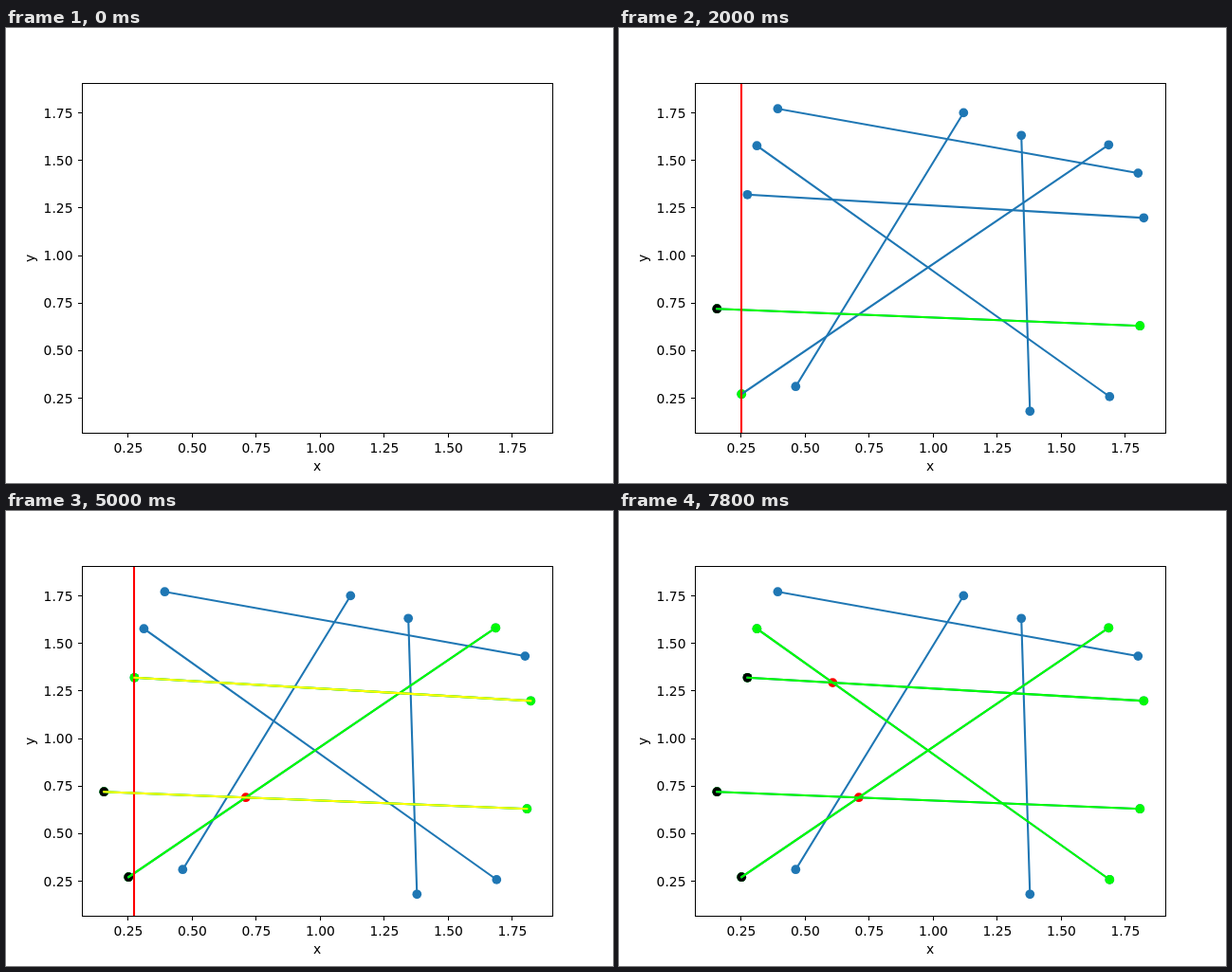
These frames come from a looping animation (640x480 px, 8000 ms). An HTML page with a canvas:

```html
<!DOCTYPE html>
<html lang="en">
<head>
<meta charset="utf-8">
<title>Sweep line</title>
<style>
  html, body { margin: 0; width: 100%; height: 100%; overflow: hidden; background: #fff; }
  canvas { display: block; }
</style>
</head>
<body>
<canvas id="stage" width="640" height="480"></canvas>
<script>
const ctx = document.getElementById('stage').getContext('2d');
const STEP_MS = 200, STEPS = 40;
const BLUE = '#1f77b4', GREEN = '#00ff00', YELLOW = '#ffff00', RED = '#ff0000', BLACK = '#000';
const BOX = { left: 80, right: 576, top: 58, bottom: 427 };

// Each segment runs from its left end to its right end: x1, y1, x2, y2.
const low = [103.3, 296.2, 549.3, 314.2];
const rising = [129.2, 386.2, 516.3, 123.3];
const high = [135.4, 175.8, 553.3, 200.3];
const falling = [145.4, 124.2, 517.3, 388.9];
const segments = [
  low, rising, high, falling,
  [167.4, 85.2, 547.3, 153.1],
  [186.3, 378.2, 363.3, 89.4],
  [424.2, 113.3, 433.3, 404.3]
];
const leftEnd = s => s.slice(0, 2);
const rightEnd = s => s.slice(2);

function crossing([ax, ay, bx, by], [cx, cy, dx, dy]) {
  const ux = bx - ax, uy = by - ay, vx = dx - cx, vy = dy - cy;
  const k = ((cx - ax) * vy - (cy - ay) * vx) / (ux * vy - uy * vx);
  return [ax + k * ux, ay + k * uy];
}

// Timeline: every addition or removal takes one step.
const dots = [], lines = [];
let step = 0;
function add(layer, color, ...shapes) {
  const item = { color, shapes, from: ++step, to: Infinity };
  layer.push(item);
  return item;
}
function remove(item) { item.to = ++step; }

function visit(segment, neighbour, meets) {
  const x = Math.round(segment[0]);
  const sweep = add(lines, RED, [x, BOX.top, x, BOX.bottom]);
  add(dots, GREEN, leftEnd(segment));
  add(lines, GREEN, segment);
  add(dots, GREEN, rightEnd(segment));
  if (neighbour) {
    const marks = [segment, neighbour].map(s => add(lines, YELLOW, s));
    if (meets) add(dots, RED, crossing(segment, neighbour));
    marks.forEach(remove);
  }
  remove(sweep);
  add(dots, BLACK, leftEnd(segment));
}

add(dots, BLUE, ...segments.flatMap(s => [leftEnd(s), rightEnd(s)]));
add(lines, BLUE, ...segments);
visit(low);
visit(rising, low, true);
visit(high, low, false);
visit(falling, high, true);

function drawDot([x, y]) {
  ctx.beginPath();
  ctx.arc(x, y, 4.86, 0, 2 * Math.PI);
  ctx.fill();
}

function drawLine([x1, y1, x2, y2]) {
  ctx.beginPath();
  ctx.moveTo(x1, y1);
  ctx.lineTo(x2, y2);
  ctx.stroke();
}

function drawLayer(layer, now, draw) {
  for (const { color, shapes, from, to } of layer) {
    if (now < from || now >= to) continue;
    ctx.fillStyle = ctx.strokeStyle = color;
    shapes.forEach(draw);
  }
}

function drawAxes() {
  const { left, right, top, bottom } = BOX;
  ctx.fillStyle = ctx.strokeStyle = BLACK;
  ctx.lineWidth = 1;
  ctx.lineCap = 'butt';
  ctx.strokeRect(left + 0.5, top + 0.5, right - left, bottom - top);
  ctx.font = '13.89px "DejaVu Sans", sans-serif';
  for (let i = 0; i < 7; i++) {
    const label = ((i + 1) / 4).toFixed(2);
    const x = 128.9 + 67.5 * i, y = 390.6 - 50.17 * i;
    const px = Math.floor(x) + 0.5, py = Math.floor(y) + 0.5;
    drawLine([px, bottom + 1, px, bottom + 5]);
    drawLine([left - 4, py, left, py]);
    ctx.textAlign = 'center';
    ctx.fillText(label, x, 448);
    ctx.textAlign = 'right';
    ctx.fillText(label, 70.5, Math.round(y) + 5);
  }
  ctx.textAlign = 'center';
  ctx.fillText('x', 328, 467);
  ctx.save();
  ctx.translate(30, 243);
  ctx.rotate(-Math.PI / 2);
  ctx.fillText('y', 0, 0);
  ctx.restore();
}

function render() {
  const now = Math.floor(performance.now() / STEP_MS) % STEPS;
  ctx.fillStyle = '#fff';
  ctx.fillRect(0, 0, 640, 480);
  ctx.lineWidth = 2.08;
  ctx.lineCap = 'square';
  ctx.save();
  ctx.beginPath();
  ctx.rect(BOX.left, BOX.top, BOX.right - BOX.left, BOX.bottom - BOX.top);
  ctx.clip();
  drawLayer(dots, now, drawDot);
  drawLayer(lines, now, drawLine);
  ctx.restore();
  drawAxes();
  requestAnimationFrame(render);
}
render();
</script>
</body>
</html>
```
